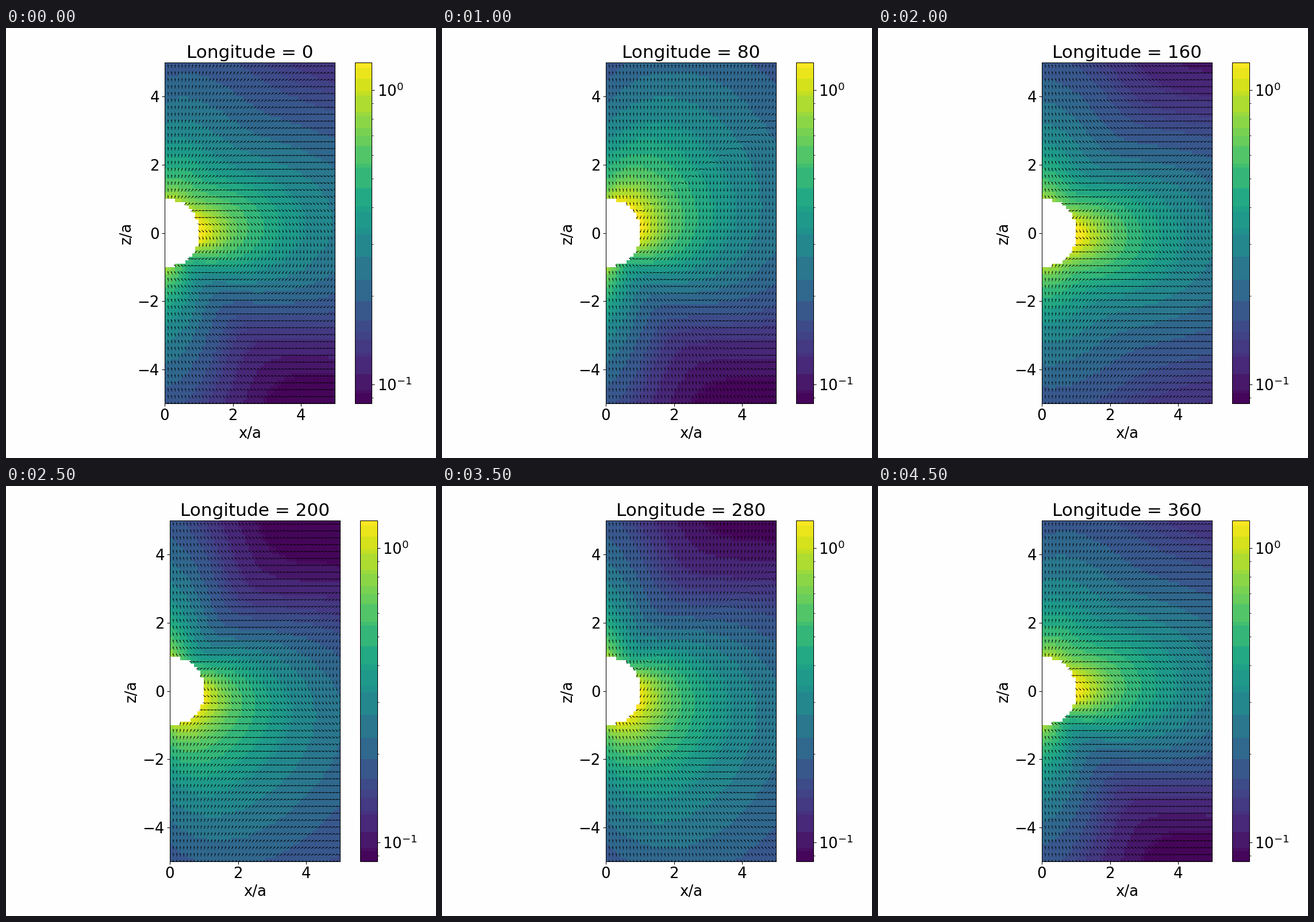
A matplotlib script for the animation above (5 s loop, 748 px wide and 748 px high).

```python
import numpy as np
import matplotlib.pyplot as plt
from matplotlib.animation import FuncAnimation
from matplotlib.colors import ListedColormap, LogNorm
from matplotlib.ticker import NullFormatter

SIZE, INCHES = 748, 8
WHITE = "#fefefe"
TOP, BOTTOM = 60.1, 653.1
WIDTH, BAR_WIDTH = 296.4, 29.65
V_MIN, V_MAX = 0.0861, 1.24

plt.rcParams.update({"font.family": "DejaVu Sans", "font.size": 20})


def banded_viridis():
    """Viridis merged into coarse colour cells, which gives uneven bands."""
    rgb = (plt.get_cmap("viridis")(np.arange(256))[:, :3] * 255).round().astype(int)
    cells = rgb // np.array([32, 16, 32])
    out = np.empty((256, 3))
    for cell in np.unique(cells, axis=0):
        same = (cells == cell).all(axis=1)
        out[same] = rgb[same].mean(axis=0) / 255
    return ListedColormap(out)


def wave(phi, order, peak):
    return np.cos(order * (phi - np.radians(peak)))


def strength(x, z, phi):
    """Field strength: an angular pattern that falls off as 1/r."""
    lat = np.arctan2(z, x)
    c2 = 0.18 + 0.085 * wave(phi, 2, 145) + 0.04 * wave(phi, 1, 60)
    c4 = 0.105 + 0.07 * wave(phi, 2, 160) + 0.03 * wave(phi, 1, 30)
    s2 = 0.39 * wave(phi, 1, 60) - 0.015
    s4 = -0.06 * wave(phi, 1, 80)
    base = 0.88 + c2 - c4
    pattern = (base + c2 * np.cos(2 * lat) + c4 * np.cos(4 * lat)
               + s2 * np.sin(2 * lat) + s4 * np.sin(4 * lat))
    return pattern / np.hypot(x, z)


def direction(x, z, phi):
    """Unit (Bx, Bz) of a slightly tilted dipole."""
    r = np.hypot(x, z)
    nx, ny, nz = x * np.cos(phi) / r, x * np.sin(phi) / r, z / r
    mx, my, mz = 0.12 + 0.3 / r, 0.03, 1.0
    along = 3 * (mx * nx + my * ny + mz * nz)
    bx, bz = along * nx - mx, along * nz - mz
    size = np.hypot(bx, bz)
    return bx / size, bz / size


def box(left, width):
    return [left / SIZE, 1 - BOTTOM / SIZE, width / SIZE, (BOTTOM - TOP) / SIZE]


X, Z = np.meshgrid(np.linspace(0, 5, 50), np.linspace(-5, 5, 100))
inside = np.hypot(X, Z) < 1
picked = np.zeros_like(inside)
picked[::2, 1:] = True
picked &= ~inside
QX, QZ = X[picked], Z[picked]


def field(phi):
    return np.ma.array(strength(X, Z, phi), mask=inside)


fig = plt.figure(figsize=(INCHES, INCHES), dpi=SIZE / INCHES, facecolor=WHITE)
ax = fig.add_axes(box(276, WIDTH), facecolor=WHITE)
cax = fig.add_axes(box(606.8, BAR_WIDTH))

image = ax.imshow(field(0), origin="lower", extent=(0, 5, -5, 5), aspect="auto",
                  interpolation="nearest", cmap=banded_viridis(),
                  norm=LogNorm(V_MIN, V_MAX))
bar = fig.colorbar(image, cax=cax)
bar.ax.yaxis.set_minor_formatter(NullFormatter())

arrows = ax.quiver(QX, QZ, *direction(QX, QZ, 0), pivot="mid", units="dots",
                   width=0.71, scale_units="dots", scale=1 / 6.6)
ax.set(xlim=(0, 5), ylim=(-5, 5), xticks=[0, 2, 4], yticks=[-4, -2, 0, 2, 4],
       xlabel="x/a", ylabel="z/a")
title = ax.set_title("Longitude = 0")


def draw(i):
    degrees = 40 * i
    phi = np.radians(degrees)
    # the layout settles a little to the right after the first step
    ax.set_position(box(276 if i == 0 else 285, WIDTH))
    cax.set_position(box(606.8 if i == 0 else 616.1, BAR_WIDTH))
    image.set_data(field(phi))
    arrows.set_UVC(*direction(QX, QZ, phi))
    title.set_text(f"Longitude = {degrees}")
    return image, arrows, title


anim = FuncAnimation(fig, draw, frames=10, interval=500, repeat=True,
                     repeat_delay=0, blit=False)
plt.show()
```
